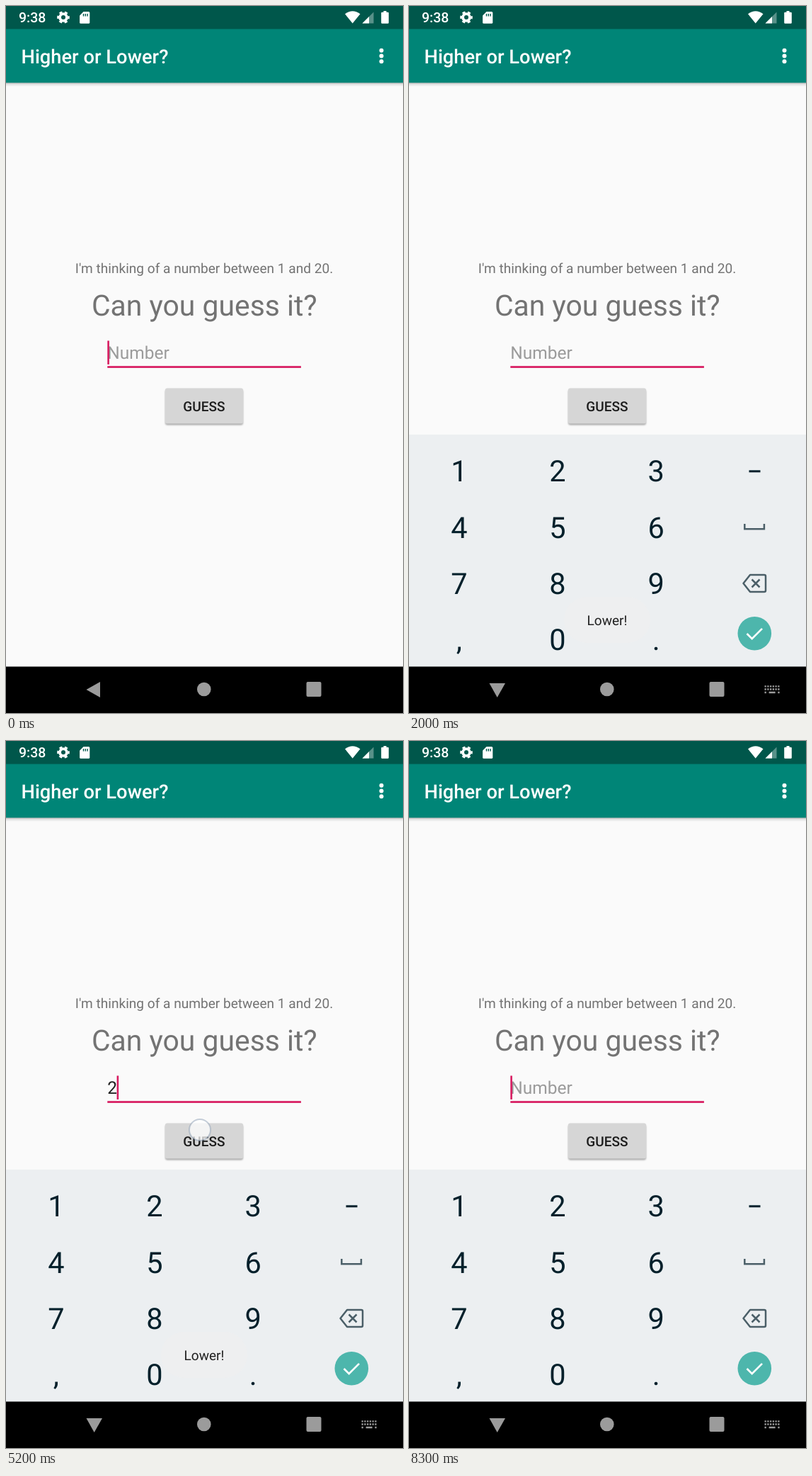
An HTML page for the animation above (8.4 s loop, 561 px wide and 998 px high).

```html
<!DOCTYPE html>
<html lang="en">
<head>
<meta charset="utf-8">
<title>Higher or Lower?</title>
<style>
  html, body { margin: 0; width: 100%; height: 100%; overflow: hidden; background: #fafafa; }
  svg { display: block; width: 100%; height: 100%; }
  text { font-family: Roboto, sans-serif; font-size: 19.09px; text-rendering: geometricPrecision; }
  .mid { text-anchor: middle; }
  .medium { font-weight: 500; }
  .key { font-size: 41.5px; fill: #04202b; }
  .line { fill: none; stroke: #4b5f68; stroke-width: 2.5; }
</style>
</head>
<body>
<svg viewBox="0 0 561 998">
  <defs>
    <linearGradient id="shade" x2="0" y2="1">
      <stop stop-color="#000" stop-opacity=".3"/>
      <stop offset=".4" stop-color="#000" stop-opacity=".1"/>
      <stop offset="1" stop-color="#000" stop-opacity="0"/>
    </linearGradient>
    <filter id="blur" x="-10%" y="-20%" width="120%" height="140%"><feGaussianBlur stdDeviation="1.3"/></filter>
    <clipPath id="buttonClip"><rect x="225" y="539.5" width="110" height="50" rx="2.7"/></clipPath>
  </defs>

  <rect width="561" height="998" fill="#fafafa"/>
  <rect y="108" width="561" height="6" fill="url(#shade)"/>
  <rect y="32" width="561" height="76.3" fill="#008577"/>
  <rect width="561" height="32.5" fill="#00574b"/>

  <!-- status bar -->
  <g fill="#fff">
    <text class="medium" x="18" y="23.3" style="font-size:19.5px">9:38</text>
    <g fill="none" stroke="#fff">
      <circle cx="81" cy="16" r="4.9" stroke-width="3.8"/>
      <circle cx="81" cy="16" r="7.5" stroke-width="2.6" stroke-dasharray="4.2 3.65" stroke-dashoffset="2.1"/>
    </g>
    <path d="M109.5 8h7.2q1.6 0 1.6 1.6v13.6q0 1.6-1.6 1.6h-11q-1.6 0-1.6-1.6v-9.8z"/>
    <path d="M109.5 11v3.6M112.3 11v3.6M115.1 11v3.6" stroke="#00574b" stroke-width="1.4"/>
    <path d="M479 11.2Q489.7 3.2 500.5 11.2L489.7 24.5z"/>
    <path d="M503.5 24.5L519.5 8.5v16z" opacity=".35"/>
    <path d="M503.5 24.5L513 15v9.5z"/>
    <path d="M533.5 7h4v1.7h2q1.3 0 1.3 1.3v13.5q0 1.3-1.3 1.3h-8q-1.3 0-1.3-1.3V10q0-1.3 1.3-1.3h2z"/>
    <text class="medium" x="21.5" y="81" style="font-size:27.27px">Higher or Lower?</text>
    <circle cx="530.5" cy="62.7" r="3"/><circle cx="530.5" cy="70.5" r="3"/><circle cx="530.5" cy="78.3" r="3"/>
  </g>

  <!-- form -->
  <text class="mid" x="280" y="377" fill="#737373">I'm thinking of a number between 1 and 20.</text>
  <text class="mid" x="280.3" y="437" fill="#737373" style="font-size:40.9px">Can you guess it?</text>
  <text id="field" x="143.2" y="498.3" style="font-size:24.54px"></text>
  <rect x="143.3" y="508.2" width="273.6" height="2.7" fill="#d81b60"/>
  <rect id="cursor" y="472.5" width="2.6" height="33.5" fill="#d81b60"/>
  <rect x="225" y="541.5" width="110" height="50" rx="3" opacity=".32" filter="url(#blur)"/>
  <rect x="225" y="539.5" width="110" height="50" rx="2.7" fill="#d6d6d6"/>
  <g clip-path="url(#buttonClip)"><circle id="ripple"/></g>
  <text class="mid medium" x="280" y="571.8" fill="#1c1c1c">GUESS</text>

  <g id="keyboard">
    <rect y="605" width="561" height="365" fill="#eceff1"/>
    <g id="keys"></g>
    <rect x="480.5" y="655.3" width="16" height="3" fill="#04202b"/>
    <path class="line" d="M474.3 731v7.3h27.6V731"/>
    <path class="line" d="M482 803h20q2 0 2 2v20q0 2-2 2h-20l-9.5-12z" stroke-linejoin="round"/>
    <path class="line" d="M484.5 809.5l11 11m0-11l-11 11"/>
    <circle cx="488.3" cy="885.7" r="23.8" fill="#4db6ac"/>
    <path d="M477.5 886l7.2 7.2 14.3-14.3" fill="none" stroke="#fff" stroke-width="2.7"/>
  </g>

  <!-- navigation bar -->
  <rect y="932.5" width="561" height="65.5"/>
  <g fill="#9b9b9b">
    <path id="back" d="M113.5 965L133 954v22z"/>
    <path id="down" d="M113.5 956h22.5L124.7 976z"/>
    <circle cx="279.8" cy="964.5" r="9.8"/>
    <rect x="424.5" y="954" width="21" height="21" rx="2"/>
    <g id="switcher">
      <path d="M502.5 960.3h21M502.5 964.5h21" stroke="#9b9b9b" stroke-width="2.3" stroke-dasharray="2.3 1.44"/>
      <path d="M502.5 969h2.3m3.8 0h9m3.7 0h2.3" stroke="#9b9b9b" stroke-width="2.3"/>
    </g>
  </g>

  <g id="toasts"></g>
  <circle id="touch" r="15" fill="#fff" fill-opacity=".72" stroke="#8b9db3" stroke-opacity=".5" stroke-width="2"/>
</svg>

<script>
const LOOP = 8400, TICK = 100, BLINK = 495;
const $ = id => document.getElementById(id);
const clamp = v => Math.max(0, Math.min(1, v));
const set = (el, attrs) => { for (const k in attrs) el.setAttribute(k, attrs[k]); };

// Moments when the field content changes; each restarts the cursor blink.
const edits = [[0, ''], [800, '5'], [1390, ''], [2900, '3'], [3610, ''], [4800, '2'], [5290, '']];
const taps = [
  { at: 290, x: 280, y: 486, field: true },
  { at: 1310, x: 266, y: 552 },
  { at: 3530, x: 274, y: 549 },
  { at: 5210, x: 274, y: 549 }
];
const toasts = [
  { text: 'Lower!', half: 61, show: 1500, hide: 3400 },
  { text: 'Lower!', half: 61, show: 3800, hide: 5250 },
  { text: 'Correct! Try again!', half: 110.5, show: 5500, hide: 7260 }
];

$('keys').innerHTML = ['123', '456', '789', ',0.'].map((row, j) =>
  [...row].map((c, i) =>
    `<text class="key mid" x="${70.8 + i * 139.2}" y="${671.3 + j * 79.2}">${c}</text>`).join('')).join('');

$('toasts').innerHTML = toasts.map(({ text, half }) =>
  `<g><rect x="${280 - half}" y="834" width="${half * 2}" height="65" rx="32.5" fill="#eeeff0"/>
   <text class="mid" x="280" y="873.5" fill="#212121">${text}</text></g>`).join('');

function drawField(t) {
  const [since, value] = edits.filter(e => e[0] <= t).pop();
  $('field').textContent = value || 'Number';
  set($('field'), { fill: value ? '#212121' : '#9b9b9b' });
  set($('cursor'), {
    x: value ? 156.6 : 143.3,
    opacity: Math.floor((t - since) / BLINK) % 2 ? 0 : 1
  });
}

function drawTap(t) {
  const tap = taps.filter(p => p.at - 110 <= t).pop();
  const age = tap ? t - tap.at : 1e4;
  set($('touch'), { cx: tap ? tap.x : 0, cy: tap ? tap.y : 0, opacity: 1 - clamp(age / 140) });
  const on = tap && !tap.field && age > 0;
  const grow = on ? 1 - (1 - clamp(age / 225)) ** 2 : 0;
  set($('ripple'), {
    cx: on ? tap.x + (280 - tap.x) * grow * .3 : 0,
    cy: on ? tap.y + (565 - tap.y) * grow * .3 : 0,
    r: 83 * grow,
    opacity: .1 * (1 - clamp((age - 80) / 320))
  });
}

function drawKeyboard(t) {
  const p = clamp((t - 250) / 350), out = 1 - (1 - p) ** 3;
  set($('keyboard'), { opacity: out, transform: `translate(0 ${33 * (1 - p) ** 4})` });
  set($('back'), { opacity: 1 - p, transform: `rotate(${-90 * p} 124.7 965)` });
  set($('down'), { opacity: p, transform: `rotate(${90 * (1 - p)} 124.7 965)` });
  set($('switcher'), { opacity: p });
}

function drawToasts(t) {
  toasts.forEach(({ show, hide }, i) => {
    const enter = 1 - (1 - clamp((t - show) / 500)) ** 2;
    const leave = 1 - clamp((t - hide) / 500) ** 2;
    set($('toasts').children[i], { opacity: enter * leave });
  });
}

function frame() {
  const t = Math.floor(performance.now() % LOOP / TICK) * TICK;
  drawField(t);
  drawTap(t);
  drawKeyboard(t);
  drawToasts(t);
  requestAnimationFrame(frame);
}
frame();
</script>
</body>
</html>
```
